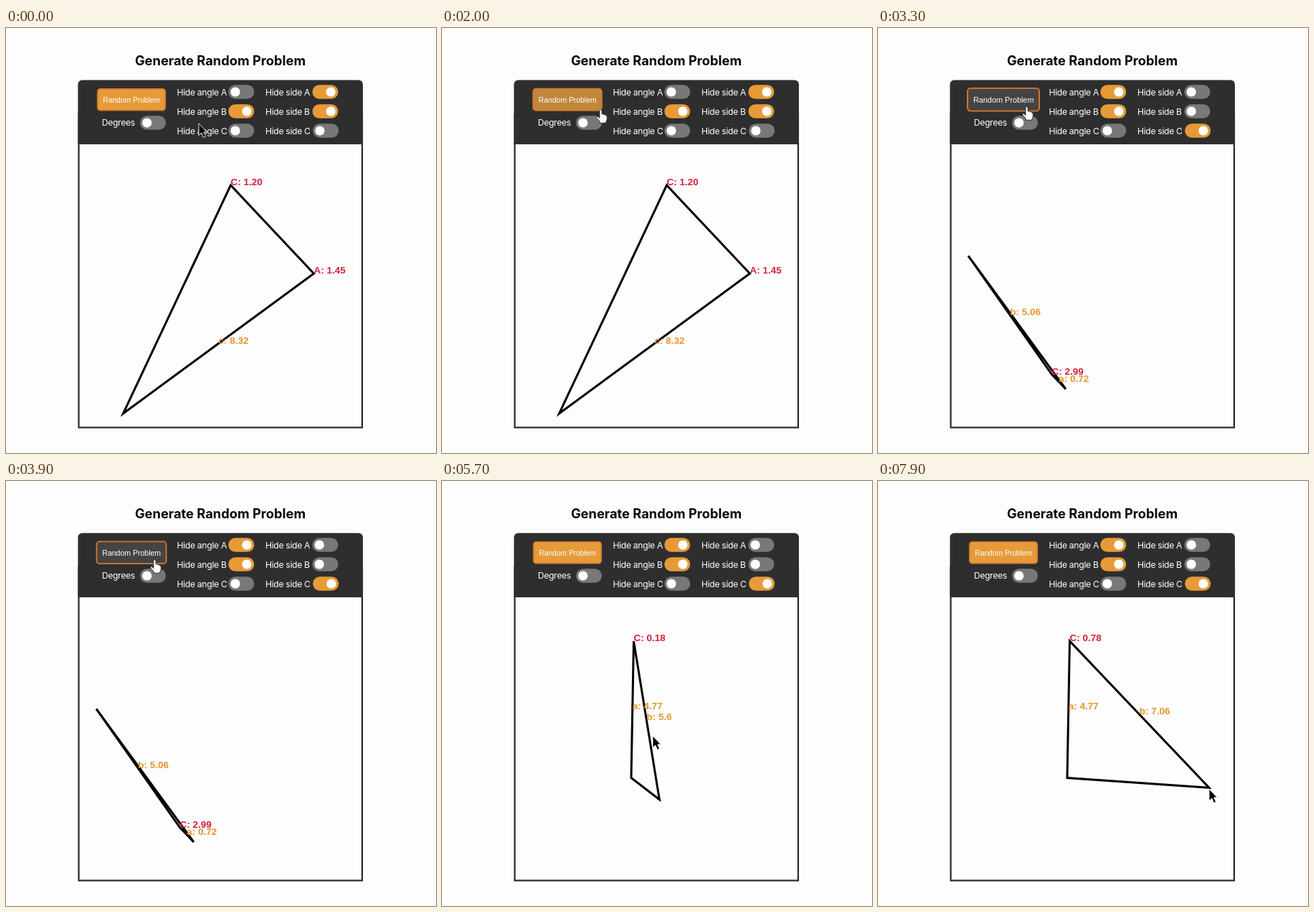
Animation, 600 px wide and 592 px high, one loop 8 s. Source, as an HTML page:

```html
<!DOCTYPE html>
<html lang="en">
<head>
<meta charset="utf-8">
<title>Generate Random Problem</title>
<style>
  html, body { margin: 0; width: 100%; height: 100%; overflow: hidden; background: #fefdfe; }
  svg { display: block; width: 600px; height: 592px; }
  .title { font: 700 18.3px Inter, sans-serif; text-anchor: middle; fill: #060606; }
  .ui { font: 400 12.2px Inter, sans-serif; letter-spacing: -.33px; fill: #fff; }
  .btn { font: 400 10.25px "Liberation Sans", Arial, sans-serif; text-anchor: middle; fill: #fff; }
  .tag { font: 700 13.5px "Liberation Sans", Arial, sans-serif; }
</style>
</head>
<body>
<svg id="stage" viewBox="0 0 600 592">
  <text class="title" x="299" y="52.4">Generate Random Problem</text>
  <rect x="101.5" y="120" width="395.5" height="436.5" fill="none" stroke="#26282b" stroke-width="2.2"/>
  <path d="M100.4 162V78.5a6 6 0 0 1 6-6H492a6 6 0 0 1 6 6V162Z" fill="#2f2e2f"/>
  <g id="panel"></g>
  <g id="button">
    <rect id="face" x="127.8" y="84.8" width="94.4" height="29.9" rx="4" stroke-width="1.8"/>
    <text class="btn" x="175.2" y="103.5">Random Problem</text>
  </g>
  <path id="tri" fill="none" stroke="#000" stroke-width="3" stroke-miterlimit="10"/>
  <g id="tags"></g>
  <path id="arrow" d="M0 0V16.5L3.8 13L6.6 19.4L9.6 18.1L6.9 11.9H11.4Z" fill="#000" stroke="#fff" stroke-width=".9"/>
  <path id="hand" d="M-1.6 9.5V1.2a1.6 1.6 0 0 1 3.2 0V6q2.6-.6 2.9.7q2.4-.3 2.6 1q1.8 0 1.7 1.9V13q-.2 2.3-1.5 3.6V18.3H-1.2V16.6L-5.4 11.4q-1.2-1.7.2-2.2q1.2-.4 2.4 1.2L-1.6 11.6Z" fill="#fff" stroke="#222" stroke-width=".9"/>
</svg>
<script>
const LOOP = 8000, STEP = 100, UNIT = 39.94;
const ORANGE = [230, 155, 56], GRAY = [120, 120, 120], DARK = [68, 68, 68];
const RIM = [211, 124, 45], HOT_RIM = [214, 120, 46];
const RED = '#d3203a', AMBER = '#e6962f';
const $ = id => document.getElementById(id);
const clamp = x => Math.max(0, Math.min(1, x));
const easeOut = x => 1 - (1 - clamp(x)) ** 2;
const mix = (a, b, k) => a + (b - a) * k;
const rgb = (a, b, k) => `rgb(${a.map((v, i) => Math.round(mix(v, b[i], k)))})`;

function add(parent, tag, attrs, text = '') {
  const el = document.createElementNS('http://www.w3.org/2000/svg', tag);
  for (const key in attrs) el.setAttribute(key, attrs[key]);
  el.textContent = text;
  parent.append(el);
  return el;
}

// Rows of [time, x, y]
const POINTER = [
  [0, 269, 133], [100, 269, 133], [500, 275, 190], [1600, 275, 190],
  [2000, 221.5, 114], [2400, 207.5, 110], [5200, 207.5, 110],
  [5700, 294, 355], [6000, 299.5, 429], [6100, 299.5, 430], [6300, 299.5, 430],
  [6700, 301, 438], [6820, 301, 438], [7100, 353, 440], [7700, 461, 429], [7800, 462, 429]
];
const DRAG = [[6820, 303.4, 443.8], [7100, 348.5, 437.5], [7700, 461, 427.4], [7800, 462, 427.2]];

function along(rows, t) {
  const n = rows.findIndex(r => r[0] > t);
  if (n < 0) return rows.at(-1).slice(1);
  if (n === 0) return rows[0].slice(1);
  const [p, q] = [rows[n - 1], rows[n]], k = (t - p[0]) / (q[0] - p[0]);
  return [mix(p[1], q[1], k), mix(p[2], q[2], k)];
}

// "on" lists the hidden values; capitals are angles, small letters sides
const SCENES = [
  { at: -1000, on: 'Bab', A: [429.5, 342], B: [163.5, 537], C: [313.5, 219],
    tags: { C: '1.20', A: '1.45', c: '8.32' } },
  { at: 2900, on: 'ABc', A: [126, 317.5], B: [262, 503], C: [242.5, 482.5],
    tags: { C: '2.99', a: '0.72', b: '5.06' } },
  { at: 4340, on: 'ACa', A: [404, 459], B: [379, 470.5], C: [208, 365],
    tags: { B: '2.13', b: '5.44', c: '0.68' } },
  { at: 4950, on: 'ABc', A: [303.4, 443.8], B: [264, 413.5], C: [267.5, 223], drag: true,
    tags: { C: '', a: '4.77', b: '' } }
];
const HOVER = [1950, 5250];
const PRESSES = [2900, 3700, 4340, 4950];

function toggle(x, y) {
  const track = add($('panel'), 'rect', { x, y: y - 9.8, width: 36, height: 19.6, rx: 9.8 });
  const knob = add($('panel'), 'circle', { cy: y, r: 6.6, fill: '#fff' });
  return k => {
    track.setAttribute('fill', rgb(GRAY, ORANGE, clamp(.5 + (k - .5) * 1.8)));
    knob.setAttribute('cx', x + 9.7 + 16 * k);
  };
}

const toggles = {};
[...'ABC'].forEach((name, i) => {
  const y = 89 + 27 * i;
  add($('panel'), 'text', { class: 'ui', x: 238.5, y: y + 5 }, 'Hide angle ' + name);
  add($('panel'), 'text', { class: 'ui', x: 362, y: y + 5 }, 'Hide side ' + name);
  toggles[name] = toggle(310.3, y);
  toggles[name.toLowerCase()] = toggle(i === 2 ? 428.2 : 427.5, y);
});
add($('panel'), 'text', { class: 'ui', x: 133.7, y: 136.4 }, 'Degrees');
toggle(187, 132)(0);

const labels = [0, 1, 2].map(() => add($('tags'), 'text', { class: 'tag' }));
const middle = (p, q) => [(p[0] + q[0]) / 2, (p[1] + q[1]) / 2];
const bearing = (p, q) => Math.atan2(q[1] - p[1], q[0] - p[0]);

function drawTriangle(scene, t) {
  const { B, C } = scene;
  const A = scene.drag ? along(DRAG, t) : scene.A;
  const tags = { ...scene.tags };
  if (scene.drag) {
    tags.C = (bearing(C, B) - bearing(C, A)).toFixed(2);
    tags.b = String(Math.round(Math.hypot(A[0] - C[0], A[1] - C[1]) / UNIT * 100) / 100);
  }
  $('tri').setAttribute('d', `M${A}L${B}L${C}Z`);
  const spots = { A, B, C, a: middle(B, C), b: middle(A, C), c: middle(A, B) };
  Object.entries(tags).forEach(([name, value], i) => {
    const [x, y] = spots[name], el = labels[i];
    el.setAttribute('x', x);
    el.setAttribute('y', y);
    el.setAttribute('fill', name < 'a' ? RED : AMBER);
    el.textContent = `${name}: ${value}`;
  });
}

function drawButton(t) {
  const hover = easeOut((t - HOVER[0]) / 400) * (1 - easeOut((t - HOVER[1]) / 350));
  const last = PRESSES.filter(p => p <= t).at(-1);
  const spring = last === undefined ? 1 : clamp((t - last - 60) / 300);
  const scale = 1 + .06 * hover * spring;
  $('face').setAttribute('fill', rgb(ORANGE, DARK, hover));
  $('face').setAttribute('stroke', rgb(RIM, HOT_RIM, hover));
  $('button').setAttribute('transform', `translate(175 99.75) scale(${scale}) translate(-175 -99.75)`);
}

function render(t) {
  const n = SCENES.findLastIndex(s => s.at <= t);
  const scene = SCENES[n], before = SCENES[Math.max(0, n - 1)];
  const k = easeOut((t - scene.at) / 350);
  for (const name in toggles)
    toggles[name](mix(+before.on.includes(name), +scene.on.includes(name), k));
  drawTriangle(scene, t);
  drawButton(t);
  const over = t >= HOVER[0] && t < HOVER[1];
  const move = `translate(${along(POINTER, t)})`;
  $('arrow').setAttribute('transform', move);
  $('hand').setAttribute('transform', move);
  $('arrow').setAttribute('visibility', over ? 'hidden' : 'visible');
  $('hand').setAttribute('visibility', over ? 'visible' : 'hidden');
}

const start = performance.now();
function tick() {
  const t = (performance.now() - start) % LOOP;
  render(Math.floor(t / STEP) * STEP);
  requestAnimationFrame(tick);
}
tick();
</script>
</body>
</html>
```
